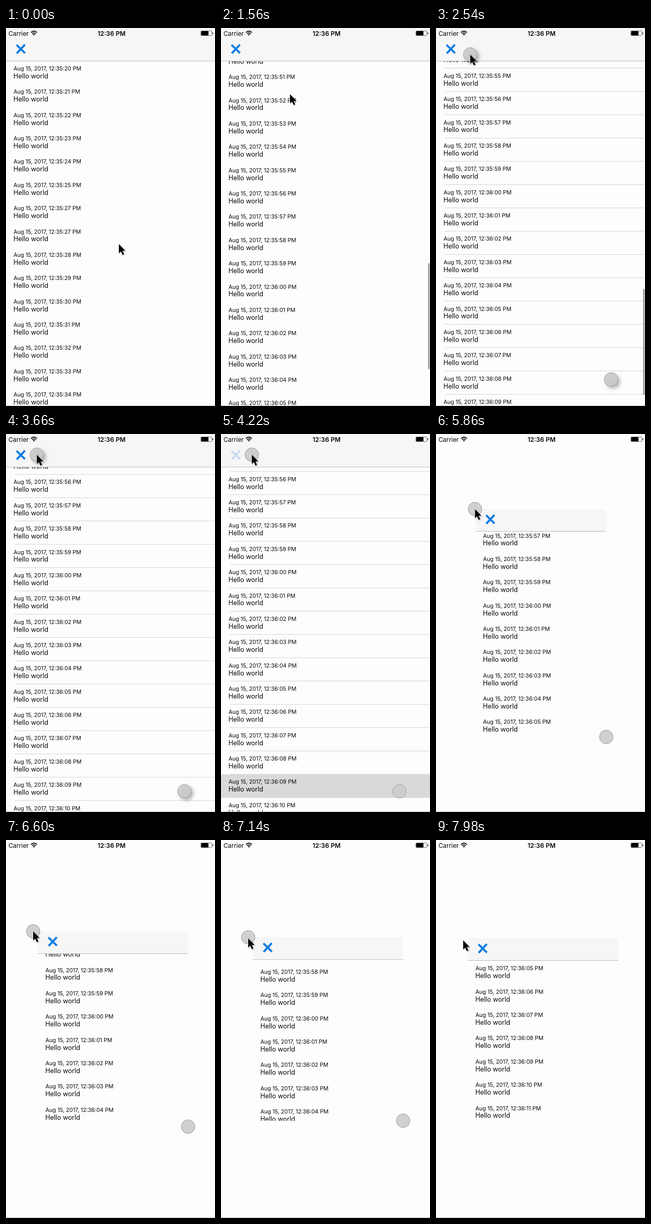
Recreate the animation shown at these times as an HTML page. Size 400 by 720 pixels, loop 8000 ms.

```html
<!DOCTYPE html>
<html lang="en">
<head>
<meta charset="utf-8">
<title>Resizable log window</title>
<style>
  html, body { margin: 0; width: 100%; height: 100%; overflow: hidden; background: #fdfdfd; }
  svg { display: block; }
  text { font-family: Inter, Roboto, sans-serif; fill: #080808; white-space: pre; }
  .date { font-size: 10.6px; }
  .message { font-size: 12.5px; }
  .rule { stroke: #d4d4d4; }
  .chrome { fill: #f6f6f6; }
  .touch { fill: rgba(203, 203, 203, .9); stroke: #9c9c9c; }
  .hover { filter: drop-shadow(4px 4px 3px rgba(0, 0, 0, .3)); }
  #cursor { filter: drop-shadow(1px 1.5px 1px rgba(0, 0, 0, .25)); }
</style>
</head>
<body>
<svg width="400" height="720" viewBox="0 0 400 720">
  <rect width="400" height="720" fill="#fdfdfd"/>
  <svg id="list"><g id="rows"></g></svg>
  <rect id="statusBack" class="chrome" width="400" height="21"/>
  <g id="nav">
    <rect id="navBack" class="chrome" height="42.5"/>
    <path id="navLine" stroke="#bababa"/>
    <path id="close" d="M20.2 11.6L36.4 27.4M36.2 11.2L20.6 27.8" stroke-width="4" fill="none"/>
  </g>
  <rect id="scrollBar" x="396.5" width="2.5" height="202" rx="1.2" fill="#8e8e8e"/>

  <text x="4.7" y="14.5" font-size="11.9">Carrier</text>
  <g fill="none" stroke="#080808" stroke-width="1.7">
    <path d="M47.6 8.6Q53.5 3.4 59.4 8.6"/>
    <path d="M49.8 11Q53.5 7.6 57.2 11"/>
  </g>
  <path d="M51.5 12.2Q53.5 10.6 55.5 12.2L53.5 14.5Z"/>
  <text x="202" y="14.5" font-size="12" font-weight="600" text-anchor="middle">12:36 PM</text>
  <rect x="373" y="5.5" width="21" height="9" rx="1.5" fill="none" stroke="#555" stroke-width=".8"/>
  <rect x="373.5" y="6" width="14" height="8" rx="1"/>
  <rect x="395" y="8.3" width="1.5" height="3.4" rx=".7" fill="#333"/>
  <path d="M0 719.5H400" stroke="#c6c6a8"/>

  <circle id="touchA" class="touch" r="13"/>
  <circle id="touchB" class="touch" r="13"/>
  <path id="cursor" d="M0 0V17.5L4 13.9L6.9 20.8L10 19.5L7.1 12.8H12.4Z" fill="#080808" stroke="#fff" paint-order="stroke"/>
</svg>
<script>
const LOOP = 8000, ROW = 44.37, ROWS = 52, NAV = 42.5;
const APPEAR = 2250, PRESS = 3900, UNDOCK = 4300, RELEASE = 7350;
const DOCKED_FRAME = { left: 0, top: 20.5, right: 400, bottom: 720 };

const el = Object.fromEntries([...document.querySelectorAll('[id]')].map(n => [n.id, n]));
const clamp = u => Math.max(0, Math.min(1, u));
const progress = (t, from, to) => clamp((t - from) / (to - from));
const smooth = u => u * u * (3 - 2 * u);
const mix = (a, b, u) => a + (b - a) * u;

// Eases through a few stops, resting before the first and after the last.
function along(stops, t) {
  let { x, y } = stops[0];
  stops.slice(1).forEach((stop, i) => {
    const u = smooth(progress(t, stops[i].at, stop.at));
    x = mix(x, stop.x, u);
    y = mix(y, stop.y, u);
  });
  return { x, y };
}

const touchAt = t => along([
  { at: 2540, x: 65.5, y: 50.5 },
  { at: 3600, x: 59, y: 39.5 },
  { at: 4220, x: 59, y: 39.5 },
  { at: 5160, x: 95.5, y: 114.3 },
  { at: 6600, x: 52, y: 174 },
  { at: 7300, x: 52, y: 187 }
], t);

// A flick: the finger accelerates, then the list coasts to rest.
function flick(t) {
  const drag = 264 * progress(t, 140, 400) ** 2;
  return t < 400 ? drag : Math.min(1589.4, 1593 - 1329 * Math.exp((400 - t) / 668));
}

// Resizing pans the list with the window; letting go sends it to the end.
function scrollAt(t) {
  if (t < UNDOCK) return flick(t);
  const pan = Math.max(1589.4, 1549 + .69 * touchAt(t).y);
  return mix(pan, 1995.8, smooth(progress(t, 7400, 7800)));
}

// The pointer drags the list, then moves on to the touch handle.
function cursorAt(t) {
  const pull = clamp(flick(t) / 285), touch = touchAt(t);
  const reach = smooth(progress(t, 1560, 2500));
  return {
    x: mix(mix(216, 132, pull), touch.x, reach),
    y: mix(mix(411.5, 126, pull), touch.y, reach) + 4 * progress(t, 6800, 7500)
  };
}

function frameAt(t) {
  if (t < UNDOCK) return DOCKED_FRAME;
  const { x, y } = touchAt(t);
  return { left: Math.max(61, x + 1), top: y, right: 400.5 - x, bottom: 720 - y };
}

function set(node, attrs) {
  for (const name in attrs) node.setAttribute(name, attrs[name]);
}

function show(node, visible) {
  node.style.display = visible ? '' : 'none';
}

function stamp(i) {
  const seconds = i === 6 ? 27 : 20 + i;
  const minute = 35 + Math.floor(seconds / 60);
  return `Aug 15, 2017, 12:${minute}:${String(seconds % 60).padStart(2, '0')} PM`;
}

el.rows.innerHTML = Array.from({ length: ROWS }, (_, i) => `
  <g transform="translate(0 ${i * ROW})">
    <rect class="back" width="400" height="${ROW}" fill="none"/>
    <text class="date" x="14.4" y="18">${stamp(i)}</text>
    <text class="message" x="14.2" y="32.9">Hello world</text>
    <path class="rule" d="M17 ${ROW - .4}H400"/>
  </g>`).join('');
const rules = el.rows.querySelectorAll('.rule');
const pressedRow = el.rows.querySelectorAll('.back')[49];

function draw(t) {
  const docked = t < UNDOCK, pressed = docked && t >= PRESS;
  const { left, top, right, bottom } = frameAt(t);
  const width = right - left, listTop = top + NAV, scroll = scrollAt(t);

  set(el.list, { x: left, y: listTop, width, height: bottom - listTop });
  set(el.rows, { transform: `translate(0 ${-scroll})` });
  set(el.nav, { transform: `translate(${left} ${top})` });
  set(el.navBack, { width });
  set(el.navLine, { d: `M0 ${NAV}H${width}` });
  set(el.close, { stroke: pressed ? '#cbdcf0' : '#147ee4' });
  set(pressedRow, { fill: pressed ? '#d9d9d9' : 'none' });
  show(el.statusBack, docked);
  rules.forEach(rule => show(rule, docked && t > 1700));

  set(el.scrollBar, {
    y: 448 + (scroll - 1359) * .272,
    opacity: progress(t, 140, 240) * (1 - progress(t, 3150, 3400))
  });

  const { x, y } = touchAt(t);
  set(el.touchA, { cx: x, cy: y });
  set(el.touchB, { cx: 400.5 - x, cy: 720 - y });
  for (const touch of [el.touchA, el.touchB]) {
    show(touch, t >= APPEAR && t < RELEASE);
    touch.classList.toggle('hover', t < PRESS);
  }

  const cursor = cursorAt(t);
  set(el.cursor, { transform: `translate(${cursor.x} ${cursor.y})` });
}

function tick() {
  draw(performance.now() % LOOP);
  requestAnimationFrame(tick);
}
tick();
</script>
</body>
</html>
```
